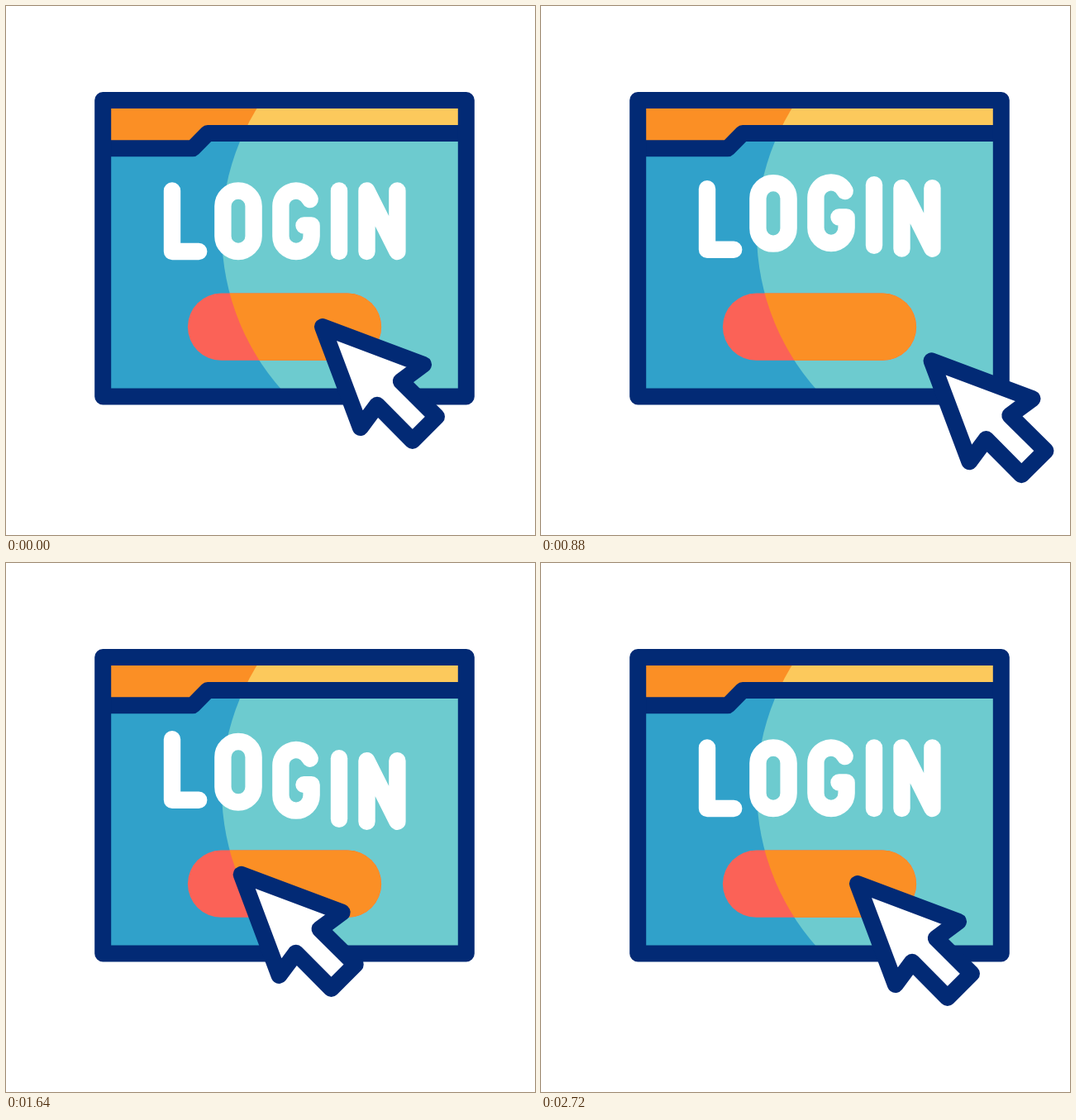
Write an HTML page with a canvas that moves like this. It is 640 px wide and 640 px high and loops after 3 s.

```html
<!DOCTYPE html>
<html lang="en">
<head>
<meta charset="utf-8">
<title>Login</title>
<style>
  html, body { margin: 0; width: 100%; height: 100%; overflow: hidden; background: #fff; }
  canvas { display: block; width: 640px; height: 640px; }
</style>
</head>
<body>
<canvas id="stage" width="640" height="640" role="img" aria-label="LOGIN"></canvas>
<script>
const ctx = document.getElementById('stage').getContext('2d');
const LOOP = 3000;
const NAVY = '#022a75', BLUE = '#30a1ca', TEAL = '#6dcbcf', RED = '#fb6257',
      ORANGE = '#fb8f25', YELLOW = '#fcc95c', GLOW = '#feca4f';

const clamp = v => Math.min(1, Math.max(0, v));
const ease = (t, from, to) => {
  const u = clamp((t - from) / (to - from));
  return u * u * (3 - 2 * u);
};
// Rises to 1 at the peak and falls back to 0
const pulse = (t, from, peak, to) => ease(t, from, peak) - ease(t, peak, to);

function trace(points, close) {
  ctx.beginPath();
  points.forEach(p => ctx.lineTo(...p));
  if (close) ctx.closePath();
}

function stroke(color, width = 20) {
  ctx.strokeStyle = color;
  ctx.lineWidth = width;
  ctx.stroke();
}

function fillPath(color) {
  ctx.fillStyle = color;
  ctx.fill();
}

function scaledAt(x, y, scale, draw) {
  ctx.save();
  ctx.translate(x, y);
  ctx.scale(scale, scale);
  draw();
  ctx.restore();
}

// Fills the current clip with one colour outside the large disc and another inside it
function twoTone(outside, inside) {
  ctx.fillStyle = outside;
  ctx.fillRect(100, 100, 480, 400);
  ctx.beginPath();
  ctx.arc(547, 274, 286, 0, Math.PI * 2);
  fillPath(inside);
}

const frame = { left: 117.2, top: 114, right: 556.8, bottom: 472.4 };

function drawWindow() {
  const { left, top, right, bottom } = frame;
  const tab = [[left + 5, 172.3], [226, 172.3], [244, 153.9], [right - 5, 153.9]];
  ctx.save();
  ctx.beginPath();
  ctx.rect(left, top, right - left, bottom - top);
  ctx.clip();
  twoTone(BLUE, TEAL);
  trace([[left, tab[0][1]], ...tab, [right, tab[3][1]], [right, top], [left, top]], true);
  ctx.clip();
  twoTone(ORANGE, YELLOW);
  ctx.restore();

  trace(tab);
  stroke(NAVY);
  ctx.beginPath();
  ctx.rect(left, top, right - left, bottom - top);
  stroke(NAVY);
}

const CAP = 223.5, BASE = 297, BOWL = 18.6;

const letters = [
  () => trace([[201, CAP], [201, BASE], [233.2, BASE]]),
  () => {
    ctx.beginPath();
    ctx.roundRect(281 - BOWL, CAP, 2 * BOWL, BASE - CAP, BOWL);
  },
  () => {
    ctx.beginPath();
    ctx.arc(351, CAP + BOWL, BOWL, -0.45, Math.PI, true);
    ctx.arc(351, BASE - BOWL, BOWL, Math.PI, 0, true);
    ctx.lineTo(351 + BOWL, 265.5);
    ctx.lineTo(360.5, 265.5);
  },
  () => trace([[403, CAP], [403, BASE]]),
  () => trace([[436.5, BASE], [436.5, CAP], [473.4, BASE], [473.4, CAP]])
];
const STAGGER = 120;
const beats = [220, 700, 1190, 1610, 2000];
const swings = [-10.5, 16, -10.5];
const bob = t => swings.reduce((y, size, i) => y + size * pulse(t, ...beats.slice(i, i + 3)), 0);

function drawLetters(t) {
  letters.forEach((outline, i) => scaledAt(0, bob(t - i * STAGGER), 1, () => {
    outline();
    stroke('#fff', 20.4);
  }));
}

const ARRIVE = 1715, PRESSED = 1915, RELEASED = 2110;
const button = { x: 337, y: 388.2, half: 76.5, r: 40.6 };

function buttonPath() {
  const { half, r } = button, q = Math.PI / 2;
  ctx.beginPath();
  ctx.moveTo(half, -r);
  ctx.arc(half, 0, r, -q, q);
  ctx.arc(-half, 0, r, q, 3 * q);
  ctx.closePath();
}

// A band of light runs once around the rim
function drawGlow(t) {
  const head = ease(t, 1725, 2085), tail = ease(t, 1815, 2175);
  if (head <= tail) return;
  const rim = 4 * button.half + 2 * Math.PI * button.r;
  buttonPath();
  ctx.setLineDash([(head - tail) * rim, rim * 2]);
  ctx.lineDashOffset = -tail * rim;
  stroke(GLOW, 22.3);
}

function drawButton(t) {
  const { x, y } = button;
  scaledAt(x, y, 1 + 0.06 * pulse(t, PRESSED, RELEASED, 2300), () => {
    ctx.save();
    buttonPath();
    ctx.clip();
    ctx.translate(-x, -y);
    twoTone(RED, ORANGE);
    ctx.restore();
    drawGlow(t);
  });
}

// The arrow is symmetric about its diagonal
const side = [[122, 45.8], [94.8, 66], [138, 108.8]];
const mirrored = side.map(([x, y]) => [y, x]).reverse();
const arrow = [[0, 0], ...side, ...mirrored];
const MIDDLE = 69;

const home = [383, 388], corner = [472.5, 429.3], target = [279, 375.3];
const legs = [
  { from: home, to: corner, start: 220, end: 700, bow: [-16, 68] },
  { from: corner, to: target, start: 995, end: ARRIVE, bow: [0, 0] },
  { from: target, to: home, start: RELEASED, end: 2715, bow: [0, 8] }
];

function cursorAt(t) {
  const { from, to, start, end, bow } = legs.findLast(leg => t >= leg.start) || legs[0];
  const s = ease(t, start, end);
  return from.map((v, k) => v + (to[k] - v) * s + bow[k] * s * (1 - s));
}

function drawCursor(t) {
  const [x, y] = cursorAt(t);
  const scale = 1 - 0.12 * pulse(t, ARRIVE, PRESSED, RELEASED);
  scaledAt(x + MIDDLE, y + MIDDLE, scale, () => {
    ctx.translate(-MIDDLE, -MIDDLE);
    trace(arrow, true);
    fillPath('#fff');
    stroke(NAVY);
  });
}

function render(t) {
  ctx.fillStyle = '#fff';
  ctx.fillRect(0, 0, 640, 640);
  drawWindow();
  drawLetters(t);
  drawButton(t);
  drawCursor(t);
}

ctx.lineCap = ctx.lineJoin = 'round';
const begun = performance.now();
function tick() {
  render((performance.now() - begun) % LOOP);
  requestAnimationFrame(tick);
}
tick();
</script>
</body>
</html>
```
